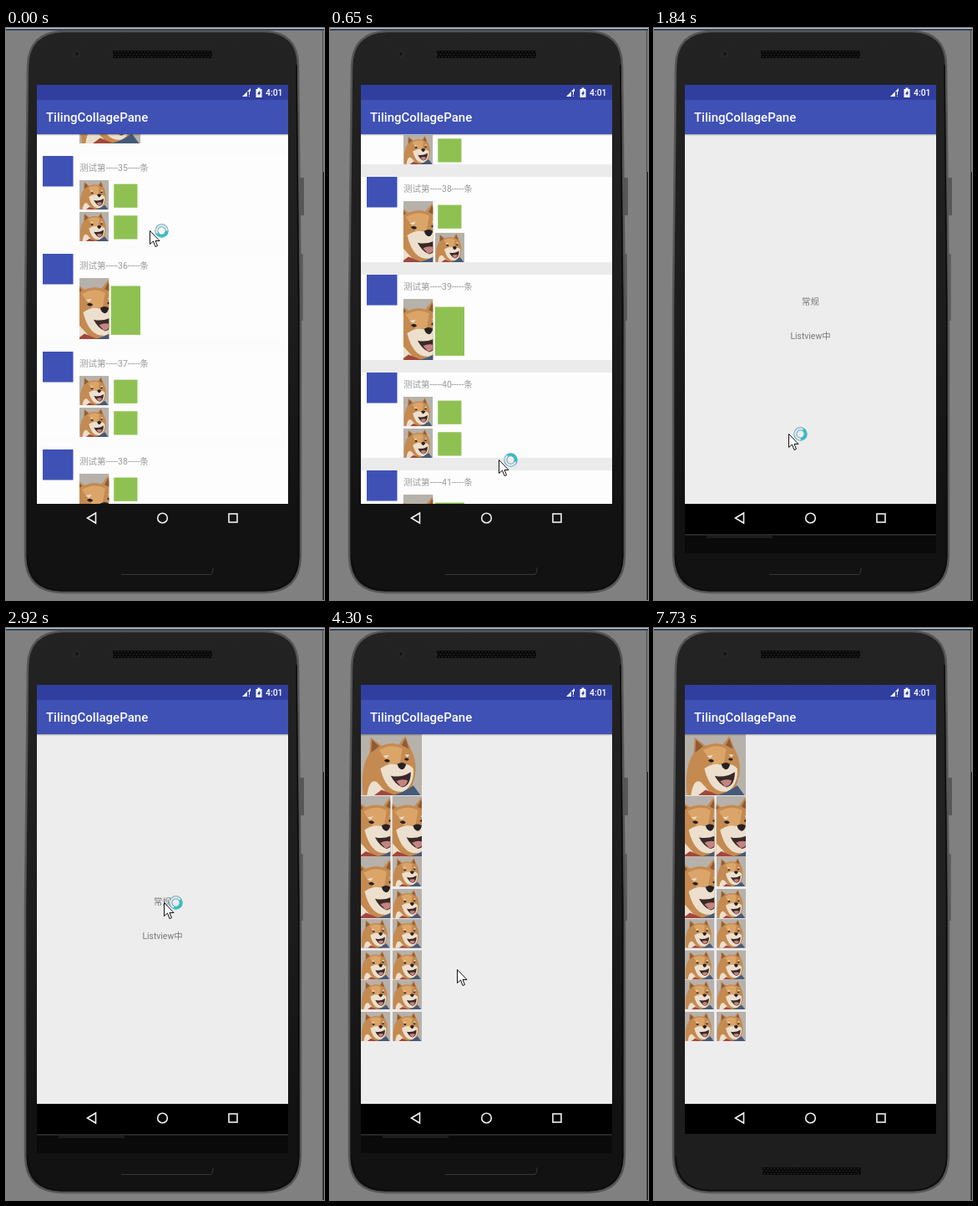
An HTML page with a canvas that plays this animation: 381x684 px, repeating every 7.83 s.

```html
<!DOCTYPE html>
<html lang="zh">
<meta charset="utf-8">
<title>Phone demo</title>
<style>
  html, body { margin: 0; width: 381px; height: 684px; overflow: hidden; background: #808080; }
  canvas { display: block; }
</style>
<canvas id="stage" width="381" height="684"></canvas>
<script>
const g = document.getElementById('stage').getContext('2d');
const LOOP = 7830;
const SANS = "Roboto, 'Noto Sans CJK SC', 'Noto Sans CJK', sans-serif";

const ticks = [0, 12, 27, 39, 53, 65, 80, 92, 107, 119, 133, 145, 157, 169, 184, 197, 225, 240, 252, 264,
  292, 307, 322, 337, 349, 361, 376, 391, 403, 418, 430, 442, 457, 470, 485, 497, 512, 524, 539, 552, 773];

// Pointer path: time, x, y
const pointer = [[0, 172, 242], [650, 202, 516], [1190, 105, 591], [1450, 105, 591], [1840, 161, 485],
  [1970, 195, 398], [2250, 211, 360], [2640, 192, 328], [3070, 188, 328], [3490, 181, 378], [3760, 182, 387],
  [4030, 150, 442], [4420, 153, 393], [4700, 161, 346], [4850, 200, 430], [4970, 294, 650], [5120, 314, 642],
  [5240, 301, 628], [5390, 286, 666], [5520, 286, 690]];

// Flat dog portrait on a 100 x 100 board
const portrait = [
  ['#b7b1ab', 'M0 0H100V100H0Z'],
  ['#c48a50', 'M4 100C0 70 4 46 14 32L16 5L34 19Q50 12 62 17L73 3L82 25C94 46 92 72 80 92L74 100Z'],
  ['#8d5c36', 'M18 9L30 20L17 30ZM73 7L79 24L67 18Z'],
  ['#dba56a', 'M30 26Q50 14 68 24L64 48L46 50Z'],
  ['#ecdfcd', 'M32 56Q46 46 60 50Q78 46 86 56Q88 82 70 94Q42 98 32 56ZM36 36L46 34L42 39ZM72 33L80 34L76 38Z'],
  ['#ecdfcd', 'M10 100Q14 72 26 78L46 100Z'],
  ['#3a2927', 'M49 68Q66 72 82 62Q82 84 68 87Q56 82 49 68Z'],
  ['#c58480', 'M58 77Q68 72 77 76Q74 86 66 86Z'],
  ['#272122', 'M60 49Q67 44 74 49Q73 57 67 58Q61 56 60 49ZM38 43Q43 38 48 44Q44 49 38 43ZM71 41Q75 37 79 41Q76 46 71 41Z'],
  ['#a2473c', 'M22 100L34 91L56 100Z'],
  ['#465a78', 'M52 100Q70 96 86 84L98 100Z']
].map(([color, d]) => [color, new Path2D(d)]);

const side = 73, half = 35.3, next = 37.7;
const layouts = {
  1: [[0, 0, side, side]],
  2: [[0, 0, half, side], [next, 0, half, side]],
  3: [[0, 0, half, side], [next, 0, half, half], [next, next, half, half]],
  4: [[0, 0, half, half], [next, 0, half, half], [0, next, half, half], [next, next, half, half]]
};
const rowKinds = '1424324231', firstRow = 34;

const clamp = v => Math.max(0, Math.min(1, v));

function box(color, x, y, w, h) {
  g.fillStyle = color;
  g.fillRect(x, y, w, h);
}

function shape(d, fill, stroke, width = 1) {
  const path = new Path2D(d);
  if (fill) { g.fillStyle = fill; g.fill(path); }
  if (stroke) { g.strokeStyle = stroke; g.lineWidth = width; g.stroke(path); }
}

function disc(x, y, r, fill, stroke, width = 1, from = 0, to = 7) {
  g.beginPath();
  g.arc(x, y, r, from, Math.min(to, from + Math.PI * 2));
  if (fill) { g.fillStyle = fill; g.fill(); }
  if (stroke) { g.strokeStyle = stroke; g.lineWidth = width; g.stroke(); }
}

function label(text, x, y, size, color, align = 'left', weight = 400) {
  g.font = `${weight} ${size}px ${SANS}`;
  g.textAlign = align;
  g.textBaseline = 'middle';
  g.fillStyle = color;
  g.fillText(text, x, y);
}

function clipped(x, y, w, h, paint) {
  g.save();
  g.beginPath();
  g.rect(x, y, w, h);
  g.clip();
  paint();
  g.restore();
}

// Square picture, centred and cropped to its cell
function picture(x, y, w, h, green) {
  clipped(x, y, w, h, () => {
    const s = Math.max(w, h);
    g.translate(x + (w - s) / 2, y + (h - s) / 2);
    g.scale(s / 100, s / 100);
    if (green) return box('#8fc152', 10, 13, 80, 80);
    for (const [color, path] of portrait) {
      g.fillStyle = color;
      g.fill(path);
    }
  });
}

function mosaic(kind, x, y, mixed) {
  layouts[kind].forEach(([dx, dy, w, h], i) => picture(x + dx, y + dy, w, h, mixed && i % 2));
}

function toolbar() {
  box('#3f51b5', 37, 86, 301, 41);
  box('rgba(0,0,0,.22)', 37, 127, 301, 1);
  box('rgba(0,0,0,.08)', 37, 128, 301, 1);
  label('TilingCollagePane', 48, 107.5, 15, '#fff', 'left', 500);
}

function listScreen(t) {
  const s = t / 1000, scroll = Math.round(561 * s - 91.5 * s * s);
  box(t < 120 ? '#fcfcfc' : '#ebebeb', 37, 127, 301, 490);
  for (let i = 0; i < rowKinds.length; i++) {
    const n = firstRow + i, y = 153 + 117 * (n - 35) - scroll;
    if (y < 10 || y > 569) continue;
    box('#fdfdfd', 37, y, 301, 102);
    box('#3f51b5', 44, y, 36.5, 36.5);
    label(`测试第-----${n}-----条`, 88, y + 15, 10.5, '#999');
    mosaic(rowKinds[i], 88, y + 29, true);
  }
  toolbar();
}

function menuScreen() {
  box('#ededed', 37, 127, 301, 442);
  label('常规', 187.5, 328, 10.4, '#777', 'center');
  label('Listview中', 187.5, 369, 10.4, '#777', 'center');
  toolbar();
}

function gridScreen(t) {
  box('#ededed', 37, 127, 301, 490);
  box('#f4f4f4', 37, 127, 73, 367);
  box('#ededed', 72, 200, 2, 294);
  box('#ededed', 74, 310, 36, 1);
  box('#ededed', 37, 383, 73, 2);
  box('#ededed', 37, 457, 73, 1);
  if (t >= 3760) [1, 2, 3, 4, 4].forEach((kind, i) => mosaic(kind, 37, 127 + i * 73.5));
  toolbar();
}

function grille(x, y, w) {
  box('#0b0b0b', x, y, w, 9);
  for (let i = 0; i < w - 2; i += 4)
    for (let j = 1; j < 9; j += 3) box('#303030', x + i + (j % 2) * 2, y + j, 1, 1);
}

function phone(t) {
  const last = t >= 7730;
  box('#808080', 0, 0, 381, 684);
  box('#c3cedb', 0, 0, 381, 1);
  box('#35414f', 0, 1, 381, 2);
  box('#4a4a4a', 379, 3, 1, 681);
  box('#1d1d1d', 380, 172, 1, 512);
  box('#575757', 352, 179, 5, 45);
  box('#606060', 352, 270, 4, 80);
  const body = 'M68 4H310Q350 5 350 46L353 330V632Q352 674 310 675H66Q24 674 23 632V330L26 46Q27 5 68 4Z';
  const shade = g.createLinearGradient(0, 0, 0, 684);
  shade.addColorStop(0, '#232323');
  shade.addColorStop(.5, last ? '#212121' : '#1d1d1d');
  shade.addColorStop(.85, last ? '#1e1e1e' : '#121212');
  shape(body, shade, '#555', 2.5);
  shape('M348 44L350.5 330V632Q350 671 310 672.5H66Q27 671 26 632', null, '#0c0c0c', 1.5);
  disc(85, 31, 3, '#151515', '#303030');
  grille(128, 27, 119);
  if (last) return grille(130, 645, 118);
  shape('M138 653.5H245Q248 653 248 645', null, '#383838');
  if (t >= 4970) {
    box('#1b1b1b', 173, 605, 133, 66);
    if (t >= 5240) box('#1b1b1b', 285, 628, 41, 43);
    grille(173, 645, 74);
  }
}

function statusBar() {
  box('#303f9f', 37, 68, 301, 18);
  shape('M283 82L293 72V82Z', '#fff');
  box('#303f9f', 289, 76, 4, 6);
  box('#fff', 291, 76, 1, 4);
  box('#fff', 291, 81, 1, 1);
  shape('M299.5 73H301.5V71.5H304.5V73H306.5V83H299.5Z', '#fff');
  shape('M303.8 74.5L301 79H302.6V81.5L305.2 77H303.8Z', '#303f9f');
  label('4:01', 311, 77.5, 10.4, '#fff', 'left', 500);
}

function navBar(t) {
  if (t >= 7730) box('#000', 37, 569, 301, 36);
  else if (t >= 1330) {
    box('#000', 37, 569, 301, 36);
    box('#262626', 37, 605, 301, 2);
    box('#0a0a0a', 37, 607, 301, 21);
    if (t >= 4970) box('#1a1a1a', 173, 605, 133, 23);
    box('#1d1d1d', 63, 607, 79, 3);
    const fade = 1 - clamp((t - 1330) / 360);
    clipped(37, 569, 301, 41, () => disc(102, 586, 42, `rgba(255,255,255,${.2 * fade})`));
  } else if (t >= 800) box('#0a0a0a', 37, 569, 301, 59);
  shape('M97.5 586L107.5 580V592Z', null, '#f2f2f2', 1.6);
  disc(187.5, 586, 5.8, null, '#f2f2f2', 1.6);
  g.strokeRect(267, 581, 10, 10);
}

// Activity window that fades while sliding in or out
function sliding(amount, paint) {
  clipped(37, 86, 301, 483, () => {
    g.globalAlpha = amount;
    g.translate(0, 43 * (1 - amount) ** 2);
    paint();
  });
}

function screens(t) {
  if (t < 3370) {
    menuScreen();
    sliding(1 - clamp((t - 1330) / 360), () => t < 1690 && listScreen(t));
  }
  if (t >= 3070) sliding(clamp((t - 2950) / 400), () => gridScreen(t));
}

function cursor(t) {
  if (t >= 5520) return;
  const i = pointer.findIndex(p => p[0] > t);
  const [t0, x0, y0] = pointer[i - 1], [t1, x1, y1] = pointer[i];
  const k = (t - t0) / (t1 - t0);
  g.save();
  g.translate(Math.round(x0 + (x1 - x0) * k) + .5, Math.round(y0 + (y1 - y0) * k) + .5);
  shape('M0 0V16L4 12.5L6.5 19L9 18L6.5 12H11.5Z', '#fff', '#111');
  if (t < 3900) {
    const turn = t / 160;
    disc(14, 0, 6.2, null, '#5e8fa3', 4);
    disc(14, 0, 6.2, null, '#d4eef2', 2.4);
    disc(14, 0, 6.2, null, '#20c3c4', 2.6, turn, turn + 2.6);
  }
  g.restore();
}

function frame(now) {
  const time = now % LOOP;
  const t = 10 * ticks.findLast(tick => tick * 10 <= time);
  phone(t);
  screens(t);
  statusBar();
  navBar(t);
  cursor(t);
  requestAnimationFrame(frame);
}

const start = performance.now();
const loop = () => frame(Math.max(0, performance.now() - start));
requestAnimationFrame(function run() {
  loop();
});
</script>
</html>
```
